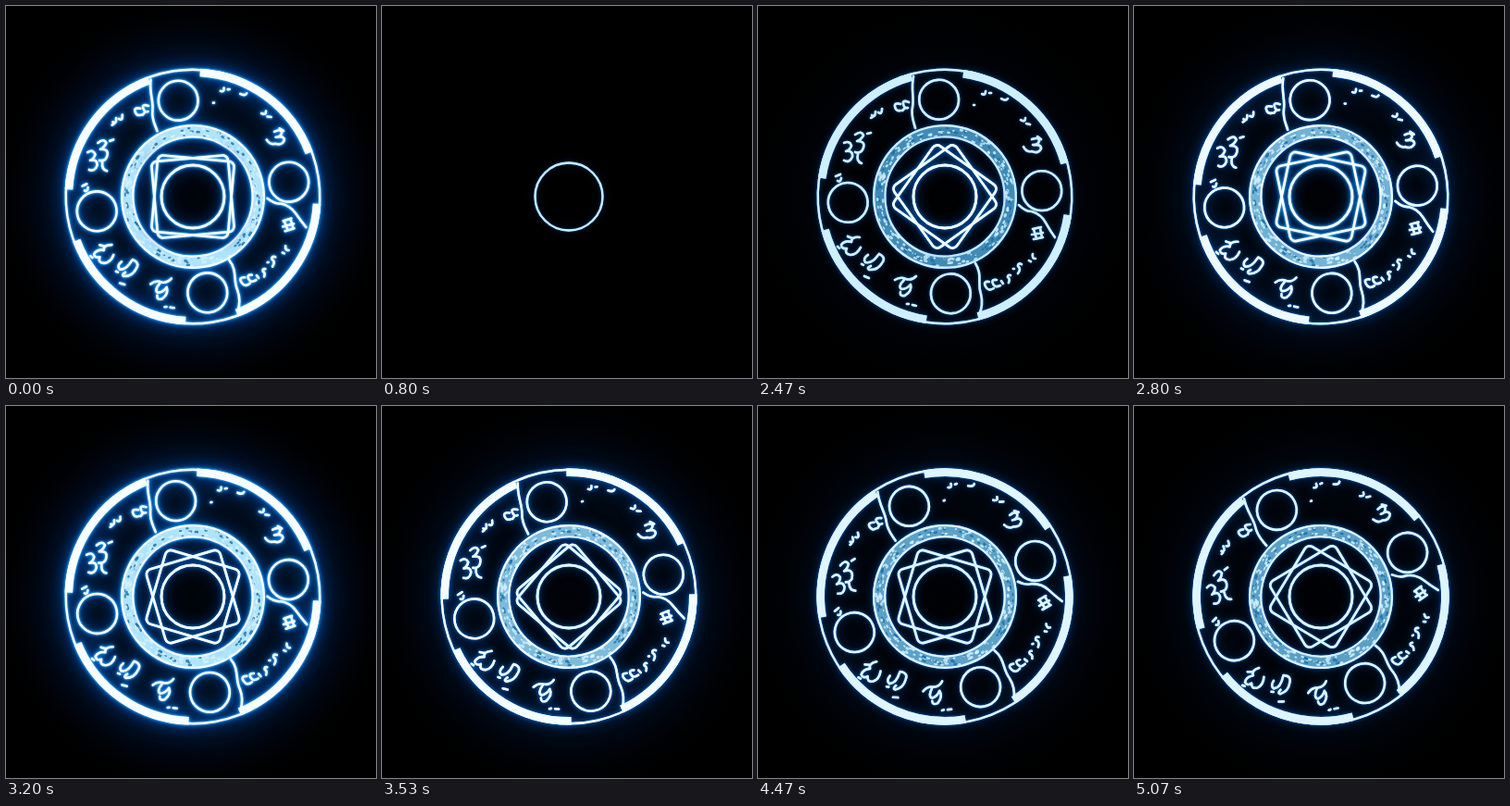
An HTML page for the animation above (5270 ms loop, 400 by 402 pixels).

```html
<!DOCTYPE html>
<html lang="en">
<head>
<meta charset="utf-8">
<title>Glowing circle</title>
<style>
  html, body { margin: 0; width: 100%; height: 100%; overflow: hidden; background: #000; }
  svg { display: block; width: 100%; height: 100%; }
</style>
</head>
<body>
<svg viewBox="0 0 400 402">
  <defs>
    <radialGradient id="haze">
      <stop offset="0" stop-color="#000610" stop-opacity=".6"/>
      <stop offset=".5" stop-color="#001024" stop-opacity=".8"/>
      <stop offset=".66" stop-color="#001c40" stop-opacity=".8"/>
      <stop offset=".8" stop-color="#000a1c" stop-opacity=".7"/>
      <stop offset="1" stop-color="#000306" stop-opacity="0"/>
    </radialGradient>
  </defs>
  <rect width="400" height="402"/>
  <circle id="aura" cx="202" cy="206" r="210" fill="url(#haze)"/>
  <g fill="none" stroke-linecap="round" stroke-linejoin="round">
    <g id="outer">
      <g id="wheel">
        <g id="rim"></g>
        <g id="band"></g>
        <g id="runes" stroke-width="2.6"></g>
      </g>
    </g>
    <g id="center">
      <g id="squares" stroke-width="2.7">
        <rect id="left" x="160.5" y="164.5" width="83" height="83" rx="6"/>
        <rect id="right" x="160.5" y="164.5" width="83" height="83" rx="6"/>
      </g>
      <circle id="core" cx="202" cy="206" r="34"/>
    </g>
  </g>
</svg>
<script>
const CX = 202, CY = 206, LOOP = 5270, STEP = 200 / 3, LAST = 76;
const RUNE_TURN = 3.5;
const $ = id => document.getElementById(id);

function add(parent, tag, attrs) {
  const node = document.createElementNS("http://www.w3.org/2000/svg", tag);
  for (const key in attrs) node.setAttribute(key, attrs[key]);
  return parent.appendChild(node);
}

// Angles run clockwise from the top.
function polar(angle, r) {
  const a = angle * Math.PI / 180;
  return (CX + r * Math.sin(a)).toFixed(2) + " " + (CY - r * Math.cos(a)).toFixed(2);
}

function arc(parent, from, to, r, width, extra) {
  return add(parent, "path", {
    d: `M${polar(from, r)}A${r} ${r} 0 0 1 ${polar(to, r)}`,
    "stroke-width": width, ...extra
  });
}

function ring(parent, cx, cy, r, width, extra) {
  return add(parent, "circle", { cx, cy, r, "stroke-width": width, ...extra });
}

function buildRim() {
  ring($("rim"), CX, CY, 137.3, 2.4);
  for (let q = 0; q < 360; q += 90) {
    arc($("rim"), q + 12, q + 78, 134.3, 8.6, { "stroke-linecap": "butt" });
    const [x, y] = polar(q, 105).split(" ");
    ring($("rim"), x, y, 21.4, 2.6);
  }
}

function buildBand() {
  let seed = 11;
  const random = () => (seed = seed * 16807 % 2147483647) / 2147483647;
  ring($("band"), CX, CY, 70.5, 12, { id: "bandFill" });
  for (let i = 0; i < 240; i++) {
    const from = random() * 360;
    arc($("band"), from, from + 0.2 + random() * 2, 66 + random() * 9, 1 + random() * 2.2,
      { stroke: random() < 0.3 ? "#1c6ea6" : "#d2f2ff", opacity: 0.8 });
  }
  ring($("band"), CX, CY, 76.8, 2.4);
  ring($("band"), CX, CY, 64.6, 2.2);
}

function buildRunes() {
  const strokes = [
    // dividers
    "M168 76C165 90 169 99 167 109S168 124 170 132",
    "M235 278C243 290 237 300 241 311Q244 323 239 334",
    "M282 215Q289 222 296 222Q306 225 311 234T321 250",
    // upper left
    "M163 104Q156 101 157 106T162 110M154 106Q147 104 148 109T154 113M159 110l-3 3",
    "M123 118q4 3 4-4M130 115q4 3 4-4M122 121l2-1",
    "M93 148q6-3 8 3q-2 5-6 6q8-1 7 6q-3 7-9 4M105 139q7-5 9 1q-3 5-7 6q9 0 7 7q-2 7-9 5M108 160q-2 8 4 10M118 138l4-1",
    "M84 184l5-2M86 189q3 2 4-3",
    // upper right
    "M233 107l1 0M242 95q4 2 4-3M250 94l2 0",
    "M263 100q5 3 7 0M284 123q5 3 5-2M290 127l4 1",
    "M296 144q8-3 8 2q-2 5-7 4q9-1 9 4q-3 6-10 3M287 152q3 6 9 5M302 141l4 3",
    // lower right
    "M297 241l9-2M296 247l12-2M298 241l3 10M305 240l2 10M298 252l10-2",
    "M297 268q-1 5 3 5M293 275l2 1M285 279q-4-2-4 2q4 3 0 8M273 291q-3-1-3 2q3 2 1 6M276 284l1 0",
    "M258 296q-6-1-4 4t8 2M250 298q-7-1-4 5t9 2M263 297l2 3",
    // lower left
    "M110 250q-9-1-9 5q-7-2-11 3q0 5 6 4q-3 6 4 7q7 0 11-8M97 249l5 2M88 262l-2-2",
    "M119 269q-6 4-3 8q7 2 14-8M131 268q8 4 3 10q-5 8-14 7q-3-2 2-4M112 279l2 1",
    "M115 292l5 2",
    "M148 296q6-4 12-1q6 2 11-3M158 296q-7 7-3 10q6 0 10-5q2 7-6 12q-6 1-5-4M161 322l2 0M167 323l4 1"
  ];
  $("runes").setAttribute("transform", `rotate(${RUNE_TURN} ${CX} ${CY})`);
  strokes.forEach(d => add($("runes"), "path", { d }));
}

const clamp = v => Math.max(0, Math.min(1, v));
const ramp = (t, from, to) => clamp((t - from) / (to - from));
const mix = (a, b, k) => a + (b - a) * k;
const rgb = (a, b, k) => `rgb(${a.map((v, i) => Math.round(mix(v, b[i], k)))})`;

function track(t, keys) {
  const i = keys.findIndex(key => key[0] > t);
  if (i < 0) return keys[keys.length - 1][1];
  if (i === 0) return keys[0][1];
  const [t0, v0] = keys[i - 1], [t1, v1] = keys[i];
  return mix(v0, v1, (t - t0) / (t1 - t0));
}

const OUTER_GLOW = [[2130, 0.15], [2470, 0.18], [2700, 0.35], [3040, 1], [3200, 1], [3730, 0.4], [5070, 0.36]];
const CENTER_GLOW = [[800, 0.08], [1200, 0.4], [1800, 0.7], [2470, 0.7], [3040, 0.85], [3200, 0.7], [3730, 0.4], [5070, 0.36]];

function shine(group, glow) {
  const shadow = (blur, color, alpha) => `drop-shadow(0 0 ${blur}px rgba(${color},${alpha}))`;
  group.setAttribute("stroke", rgb([190, 234, 255], [248, 254, 255], clamp(glow * 1.5)));
  group.style.filter = [
    shadow(mix(0.5, 0.9, glow), "110,210,255", mix(0.6, 1, glow)),
    shadow(mix(1.2, 2.4, glow), "0,135,255", mix(0.4, 1, glow)),
    shadow(mix(4, 8, glow), "0,75,170", mix(0.25, 0.9, glow))
  ].join(" ");
}

const turn = (id, angle) => $(id).setAttribute("transform", `rotate(${angle} ${CX} ${CY})`);

function draw(t) {
  const outerGlow = track(t, OUTER_GLOW);
  const spin = 0.071 * (t - 1700);
  const shown = ramp(t, 1870, 2130);

  turn("wheel", -0.00904 * Math.max(0, t - 2083));
  turn("left", -spin);
  turn("right", spin);
  $("outer").setAttribute("opacity", shown);
  $("squares").setAttribute("opacity", ramp(t, 1100, 1450));

  $("core").setAttribute("r", 34 + 2.5 * Math.exp((800 - t) / 230));
  $("core").setAttribute("stroke-width", mix(2.3, 2.9, ramp(t, 800, 1400)));
  $("core").setAttribute("opacity", ramp(t, 350, 780));

  $("bandFill").setAttribute("stroke", rgb([42, 120, 168], [175, 228, 252], outerGlow));
  shine($("outer"), outerGlow);
  shine($("center"), track(t, CENTER_GLOW));
  $("aura").setAttribute("opacity", shown * outerGlow);
}

// The picture advances on 10 ms ticks, fifteen times a second.
function stepAt(t) {
  let i = Math.floor((t + 3.4) / STEP);
  if (Math.round(i * STEP / 10) * 10 > t) i--;
  return Math.min(i, LAST);
}

// The loop opens with a single flash of the bright full circle.
function render(t) {
  const i = stepAt(t);
  draw(i === 0 ? 3040 : i * STEP);
}

buildRim();
buildBand();
buildRunes();
render(0);

let start;
let shownStep = 0;
function tick(now) {
  start ??= now;
  const t = (now - start) % LOOP;
  const i = stepAt(t);
  if (i !== shownStep) {
    shownStep = i;
    render(t);
  }
  requestAnimationFrame(tick);
}
requestAnimationFrame(tick);
</script>
</body>
</html>
```
